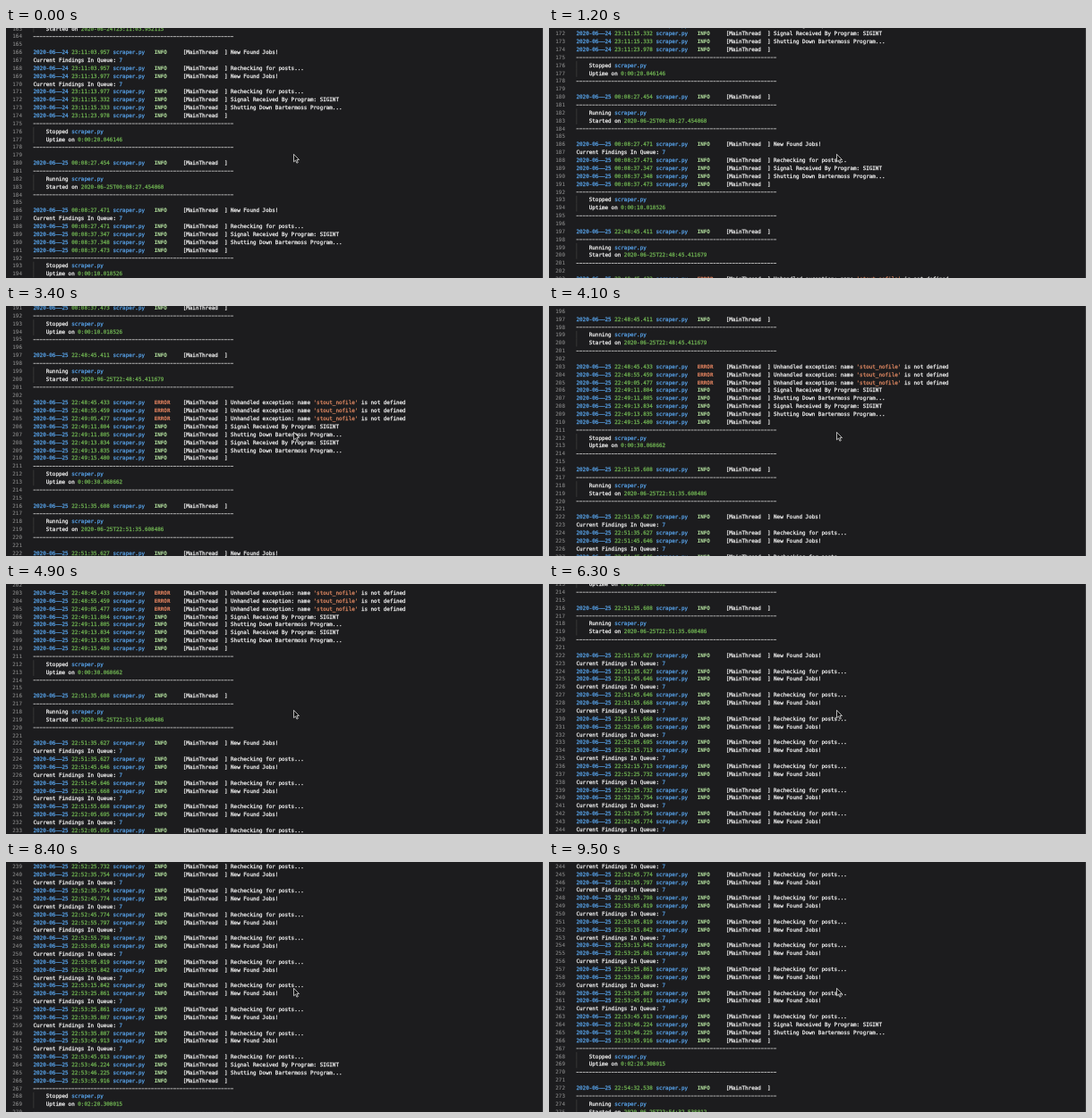
Write an HTML page that moves like this. It is 600x280 px and loops after 9.8 s.

```html
<!DOCTYPE html>
<html lang="en">
<head>
<meta charset="utf-8">
<title>Scrolling scraper log</title>
<style>
  html, body { margin: 0; width: 100%; height: 100%; overflow: hidden; background: #1c1c1e; }
  svg { display: block; width: 600px; height: 280px; background: #1c1c1e; }
  text {
    font: 12px "DejaVu Sans Mono", "Liberation Mono", monospace;
    white-space: pre;
    text-rendering: geometricPrecision;
    color: #ececec;
    fill: currentColor;
    stroke: currentColor;
    stroke-width: .55;
  }
  tspan { fill: currentColor; stroke: currentColor; }
  .num { color: #8a8a8a; stroke-width: .15; }
  .blue { color: #569fe4; }
  .green { color: #6cad50; }
  .info { color: #b0dc9c; font-weight: bold; stroke-width: .2; }
  .error { color: #e0825f; font-weight: bold; stroke-width: .2; }
  .string { color: #d98560; }
  .rule { stroke: #b8b8b8; stroke-width: 1.9; stroke-dasharray: 6.2 1.024; }
  .guide { stroke: #444; stroke-width: 1.4; }
</style>
</head>
<body>
<svg viewBox="0 0 600 280">
  <g id="log"></g>
  <rect x="599" width="1" height="280" fill="#38383a"/>
  <path transform="translate(321.5 141.3)" d="M0 0V8.6L2 6.8L3.4 9.9L4.8 9.3L3.4 6.3H6Z"
        fill="#111" stroke="#ddd" stroke-width=".8" stroke-linejoin="round"/>
</svg>
<script>
const LOOP = 9800, STEP = 100;
const SCALE = 8.862 / 18, ROW = 18, CHAR = 7.224;
const FIRST_LINE = 163, FIRST_Y = 151 - 17 * 8.862;
const TEXT_X = 30.5 / SCALE, NUM_X = 7.3 / SCALE;

// Each row is a list of [text, class] spans, or 'rule'.
const rows = [];
const add = (...spans) => rows.push(spans);
const rule = () => rows.push('rule');
const blank = () => add();

function entry(day, time, message = [], level = 'INFO') {
  add([`2020-06––${day} `, 'blue'], [time + ' ', 'green'], ['scraper.py', 'blue'],
      ['   ' + level.padEnd(9), level.toLowerCase()], ['[MainThread  ] '], ...message);
}

function found(day, time, recheckTime = time) {
  entry(day, time, [['New Found Jobs!']]);
  add(['Current Findings In Queue: '], ['7', 'blue']);
  entry(day, recheckTime, [['Rechecking for posts...']]);
}

function interrupted(day, signalTime, stopTime) {
  entry(day, signalTime, [['Signal Received By Program: SIGINT']]);
  entry(day, stopTime, [['Shutting Down Bartermoss Program...']]);
}

function stopped(day, time, uptime) {
  entry(day, time);
  rule();
  add(['    Stopped '], ['scraper.py', 'blue']);
  add(['    Uptime on '], [uptime, 'green']);
  rule();
  blank();
}

function started(day, time, micros) {
  entry(day, time);
  rule();
  add(['    Running '], ['scraper.py', 'blue']);
  startedOn(day, time + micros);
}

function startedOn(day, time) {
  add(['    Started on '], [`2020-06-${day}T${time}`, 'green']);
  rule();
  blank();
}

startedOn(24, '23:11:03.952115');
found(24, '23:11:03.957');
found(24, '23:11:13.977');
interrupted(24, '23:11:15.332', '23:11:15.333');
stopped(24, '23:11:23.978', '0:00:20.046146');

started(25, '00:08:27.454', '868');
found(25, '00:08:27.471');
interrupted(25, '00:08:37.347', '00:08:37.348');
stopped(25, '00:08:37.473', '0:00:10.018526');

started(25, '22:48:45.411', '679');
for (const time of ['48:45.433', '48:55.459', '49:05.477']) {
  entry(25, '22:' + time, [['Unhandled exception: name '], ["'stout_nofile'", 'string'],
    [' is not defined']], 'ERROR');
}
interrupted(25, '22:49:11.804', '22:49:11.805');
interrupted(25, '22:49:13.834', '22:49:13.835');
stopped(25, '22:49:15.480', '0:00:30.068662');

started(25, '22:51:35.608', '486');
for (const time of ['51:35.627', '51:45.646', '51:55.668', '52:05.695', '52:15.713',
  '52:25.732', '52:35.754', '52:45.774']) found(25, '22:' + time);
found(25, '22:52:55.797', '22:52:55.798');
for (const time of ['53:05.819', '53:15.842', '53:25.861', '53:35.887', '53:45.913']) {
  found(25, '22:' + time);
}
interrupted(25, '22:53:46.224', '22:53:46.225');
stopped(25, '22:53:55.916', '0:02:20.308015');
started(25, '22:54:32.538', '012');

const log = document.getElementById('log');

function make(parent, tag, attrs, content = '') {
  const node = document.createElementNS('http://www.w3.org/2000/svg', tag);
  for (const key in attrs) node.setAttribute(key, attrs[key]);
  node.textContent = content;
  return parent.appendChild(node);
}

rows.forEach((row, i) => {
  const y = i * ROW, baseline = y + 4.4;
  make(log, 'text', { x: NUM_X, y: baseline, class: 'num' }, FIRST_LINE + i);
  if (row === 'rule') {
    const ruleY = y + .8;
    make(log, 'line', { x1: TEXT_X, x2: TEXT_X + 63 * CHAR, y1: ruleY, y2: ruleY, class: 'rule' });
    return;
  }
  if (row.length && row[0][0].startsWith('    ')) {
    const x = TEXT_X + .7;
    make(log, 'line', { x1: x, x2: x, y1: y - ROW / 2, y2: y + ROW / 2, class: 'guide' });
  }
  const line = make(log, 'text', { x: TEXT_X, y: baseline });
  for (const [content, style = ''] of row) make(line, 'tspan', { class: style }, content);
});

// Trackpad swipes: start, end (ms), scroll reached (px), decay.
const swipes = [
  [0, 1100, 39.3, 2],
  [1100, 1800, 160, 2],
  [2300, 2900, 232.7, 2],
  [3300, 4500, 292.5, 3],
  [4600, 7100, 457.4, 3],
  [7200, 9500, 713.5, 2.89]
];

function scrollAt(time) {
  let scroll = 0;
  for (const [start, end, target, decay] of swipes) {
    if (time <= start) break;
    const u = Math.min(1, (time - start) / (end - start));
    scroll += (target - scroll) * (1 - Math.exp(-decay * u)) / (1 - Math.exp(-decay));
  }
  return scroll;
}

function draw() {
  const time = Math.floor(performance.now() % LOOP / STEP) * STEP;
  log.setAttribute('transform', `translate(0 ${FIRST_Y - scrollAt(time)}) scale(${SCALE})`);
  requestAnimationFrame(draw);
}
draw();
</script>
</body>
</html>
```
